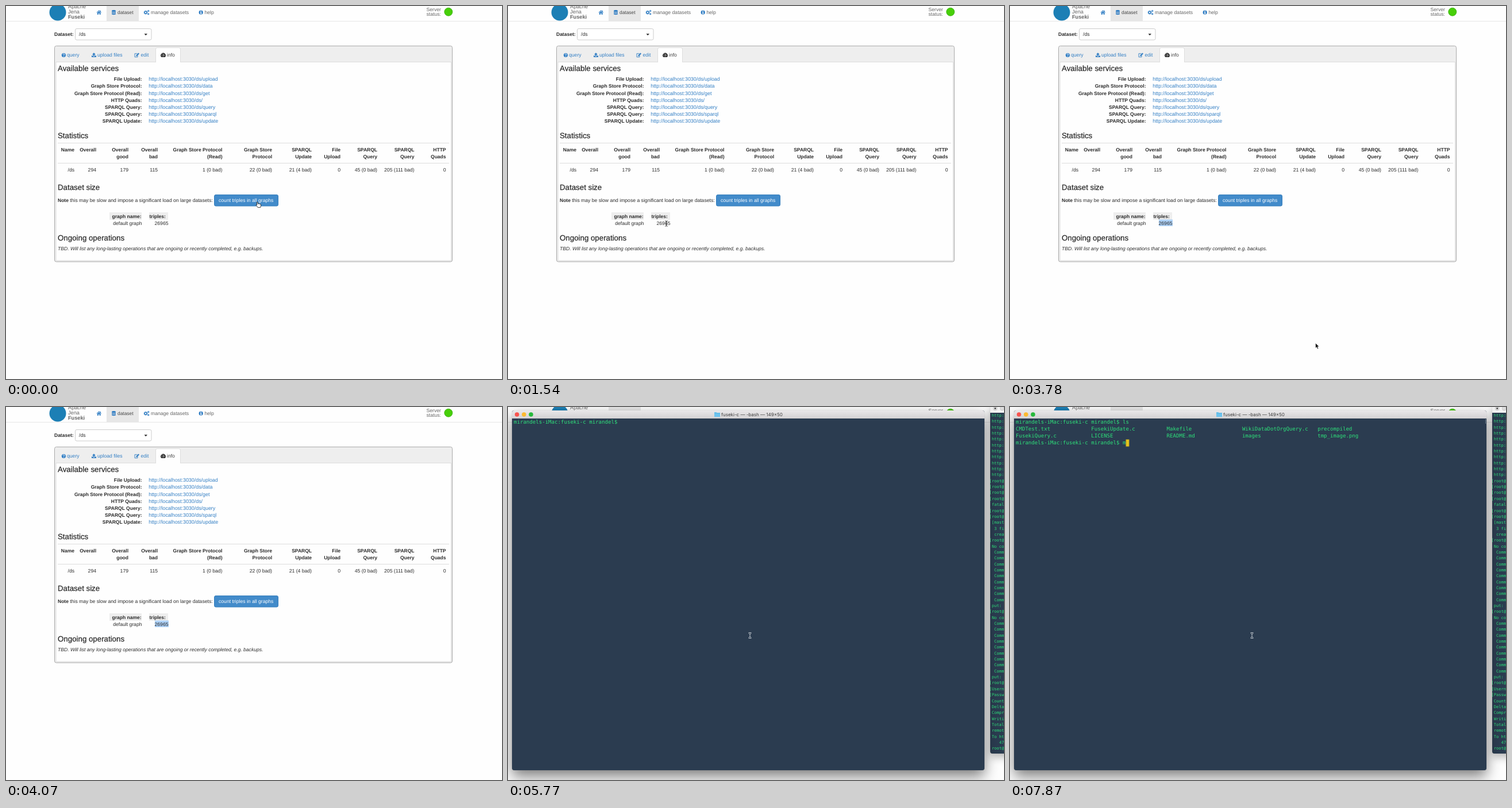
Write an HTML page that moves like this. It is 863 px wide and 649 px high and loops after 8000 ms.

```html
<!DOCTYPE html>
<html lang="en">
<head>
<meta charset="utf-8">
<title>Dataset info and terminal</title>
<style>
html, body { margin: 0; width: 100%; height: 100%; overflow: hidden; background: #fefefe; }
#stage { position: relative; width: 863px; height: 649px; overflow: hidden; background: #fefefe; }
svg, #term, .win, pre { position: absolute; }
svg { left: 0; top: 0; }
text, pre { text-rendering: geometricPrecision; white-space: pre; }
#page { font: 8.65px "Liberation Sans", Arial, sans-serif; fill: #2b2b2b; }
.b { font-size: 8.5px; font-weight: bold; }
.h { font-size: 13.3px; stroke: #2b2b2b; stroke-width: .25px; }
.r { text-anchor: end; }
.link { fill: #337fc4; }
.url { font-size: 8.88px; }
.grey { fill: #666; }
.brand { font-size: 9.2px; }

/* Windows */
#term { inset: 0; }
.win { background: #2b3c50; box-sizing: border-box; overflow: hidden; }
.front { left: 7px; top: 6px; width: 822px; height: 625.5px; border-radius: 4px; box-shadow: 0 11px 24px rgba(0,0,0,.5), 0 0 1px rgba(0,0,0,.4); }
.back { left: 839px; top: -4px; width: 60px; height: 606.5px; border-radius: 4px; box-shadow: 0 6px 16px rgba(0,0,0,.3), 0 0 1px rgba(0,0,0,.4); }
.bar { height: 14px; background: linear-gradient(#e9e7e9, #d3d1d3); }
.back .bar { background: #f3f3f3; }
pre { left: -1.5px; top: 14px; margin: 0; font: 7.1px/10.34px "DejaVu Sans Mono", monospace; color: #2ee07a; }
#shell { font: 9.09px "DejaVu Sans Mono", monospace; fill: #2ee07a; }

/* Timeline: hard changes only */
.t { animation: 8s step-end infinite; }
.off { opacity: 0; }
#term { animation-name: term; }
#hand { animation-name: hand; }
#arrow { animation-name: arrow; }
#beam { animation-name: beam; }
#pick { animation-name: pick; }
#beam2 { animation-name: beam2; }
#block { animation-name: block; }
#l { animation-name: typeL; }
#s { animation-name: typeS; }
#out { animation-name: out; }
#m { animation-name: typeM; }
@keyframes term { 58.375% { opacity: 1; } }
@keyframes hand { 7.5% { opacity: 0; } }
@keyframes pick { 26.75% { opacity: 1; } }
@keyframes arrow {
  7.5% { opacity: 1; transform: translate(371px, 356px); }
  10.125% { transform: translate(329px, 357px); }
  11.875% { transform: translate(283px, 368px); }
  13.75% { opacity: 0; }
  32.25% { opacity: 1; transform: translate(368px, 391px); }
  47.25% { transform: translate(531px, 586px); }
  49.125% { transform: translate(597px, 642px); }
  50.875% { opacity: 0; }
}
@keyframes beam {
  13.75% { opacity: 1; transform: translate(275px, 370.5px); }
  15.625% { transform: translate(274px, 375px); }
  17.375% { transform: translate(273.5px, 374px); }
  19.25% { transform: translate(272.8px, 373px); }
  30.375% { transform: translate(274.6px, 372.5px); }
  32.25% { opacity: 0; }
}
@keyframes beam2 {
  64% { opacity: 1; transform: translate(500px, 465px); }
  66.5% { transform: translate(418px, 392px); }
}
@keyframes block {
  72.125% { opacity: 0; }
  77.75% { opacity: 1; transform: none; }
  79.625% { transform: translate(5.47px, 0); }
  81.5% { transform: translate(10.94px, 0); }
  83.375% { transform: translate(0, 36.5px); }
  96.5% { opacity: 0; }
  98.375% { opacity: 1; transform: translate(5.47px, 36.5px); }
}
@keyframes typeL { 79.625% { opacity: 1; } }
@keyframes typeS { 81.5% { opacity: 1; } }
@keyframes out { 83.375% { opacity: 1; } }
@keyframes typeM { 98.375% { opacity: 1; } }
</style>
</head>
<body>
<div id="stage">
<svg id="page" width="863" height="649">
  <!-- Navigation -->
  <path d="M0 26.5H863" stroke="#e7e7e7"/>
  <rect x="175" width="56" height="26" fill="#e7e7e7"/>
  <circle cx="90" cy="11" r="14.5" fill="#1c7fb5"/>
  <g class="grey brand">
    <text x="108" y="4">Apache</text>
    <text x="108" y="13">Jena</text>
    <text x="108" y="21.6" font-weight="bold">Fuseki</text>
  </g>
  <g class="link">
    <path d="M157.5 11.2 161.7 7.2 163.6 9V7.7H164.8V10.1L166 11.2 165.3 11.8 161.7 8.6 158.2 11.8ZM158.9 11.7 161.7 9.3 164.6 11.7V15H162.6V12.6H160.9V15H158.9Z"/>
    <path d="M184 8.3C184 6.6 191 6.6 191 8.3V9C191 10.3 184 10.3 184 9ZM184 10.1Q187.5 11.6 191 10.1V11.3C191 12.6 184 12.6 184 11.3ZM184 12.4Q187.5 13.9 191 12.4V14C191 15.5 184 15.5 184 14Z"/>
    <g fill="none" stroke="#337fc4">
      <circle cx="243" cy="11.3" r="2" stroke-width="1.6"/>
      <circle cx="243" cy="11.3" r="3" stroke-dasharray="1.2 1.15"/>
      <circle cx="247.7" cy="8.6" r="1.1" stroke-width="1.1"/>
      <circle cx="247.7" cy="13.8" r="1.1" stroke-width="1.1"/>
    </g>
    <circle cx="339.2" cy="11.2" r="3.6"/>
    <path d="M338.5 8.3H340V9.4H338.5ZM338 10.2H340V13H340.6V13.8H338V13H338.6V11H338Z" fill="#fff"/>
  </g>
  <text x="194" y="14" fill="#444" font-size="8.4">dataset</text>
  <g class="grey">
    <text x="252" y="14">manage datasets</text>
    <text x="345.5" y="14">help</text>
    <text x="731.5" y="9">Server</text>
    <text x="731.5" y="17.3">status:</text>
  </g>
  <circle cx="769.8" cy="10.2" r="7" fill="#47cf08" stroke="#35ad0a" stroke-width=".8"/>

  <!-- Dataset chooser -->
  <text class="b" x="84" y="52">Dataset:</text>
  <rect x="120.5" y="39.5" width="132.5" height="19.5" rx="2.5" fill="#fff" stroke="#ccc"/>
  <text x="127" y="52">/ds</text>
  <path d="M240.5 48.3H246L243.2 51.2Z"/>

  <!-- Tab panel -->
  <rect x="84.5" y="69.5" width="692" height="375.5" rx="3" fill="#eee" stroke="#aaa"/>
  <rect x="87" y="97.5" width="687.5" height="345.5" fill="#fefefe" stroke="#ddd"/>
  <path d="M260.5 98V75Q260.5 72.5 263 72.5H301Q303.5 72.5 303.5 75V98" fill="#fefefe" stroke="#ddd"/>
  <g class="link">
    <circle cx="100.4" cy="85.5" r="3.6"/>
    <path d="M99 84.5Q99.1 83.3 100.4 83.3 101.8 83.4 101.8 84.5 101.7 85.2 100.5 85.8V86.3M100.5 87V88" fill="none" stroke="#fff" stroke-width=".9"/>
    <path d="M152.9 81.3 156 84.5H154V87H151.8V84.5H149.8ZM149 86.3H151.2V87.7H154.6V86.3H157V89H149Z"/>
    <path d="M229 86V88.8H224V82.8H228.5" fill="none" stroke="#337fc4" stroke-width=".9"/>
    <path d="M226.3 87.3V85.7L230.4 81.5 232 83.1 227.9 87.3Z"/>
    <text x="106" y="88.3">query</text>
    <text x="159" y="88.3">upload files</text>
    <text x="234.5" y="88.3">edit</text>
  </g>
  <path d="M270.3 89A4.4 4.4 0 1 1 276.8 89Z" fill="#333"/>
  <path d="M273.3 87.7 274.6 84M270.4 86.2H271.4M275.8 86.2H276.8M271.4 83.7 272 84.3M273.2 82.7V83.5" stroke="#fff" stroke-width=".8"/>
  <text x="280" y="88.3" fill="#444">info</text>

  <!-- Services -->
  <text class="h" x="90" y="112.5">Available services</text>
  <g class="b r">
    <text x="236.5" y="130.2">File Upload:</text>
    <text x="236.5" y="142.4">Graph Store Protocol:</text>
    <text x="236.5" y="154.5">Graph Store Protocol (Read):</text>
    <text x="236.5" y="166.7">HTTP Quads:</text>
    <text x="236.5" y="178.9">SPARQL Query:</text>
    <text x="236.5" y="191">SPARQL Query:</text>
    <text x="236.5" y="203.2">SPARQL Update:</text>
  </g>
  <g class="link url">
    <text x="248.3" y="130.2">http://localhost:3030/ds/upload</text>
    <text x="248.3" y="142.4">http://localhost:3030/ds/data</text>
    <text x="248.3" y="154.5">http://localhost:3030/ds/get</text>
    <text x="248.3" y="166.7">http://localhost:3030/ds/</text>
    <text x="248.3" y="178.9">http://localhost:3030/ds/query</text>
    <text x="248.3" y="191">http://localhost:3030/ds/sparql</text>
    <text x="248.3" y="203.2">http://localhost:3030/ds/update</text>
  </g>

  <!-- Statistics -->
  <text class="h" x="90" y="230">Statistics</text>
  <path d="M90 238.5H771M90 273.5H771" stroke="#ddd"/>
  <g class="r" id="stats"></g>

  <!-- Dataset size -->
  <text class="h" x="90" y="319.5">Dataset size</text>
  <text x="90" y="341"><tspan class="b">Note</tspan> this may be slow and impose a significant load on large datasets:</text>
  <rect x="362.5" y="328.5" width="111" height="19.5" rx="2.5" fill="#428bca" stroke="#357ebd"/>
  <text x="370" y="341.3" fill="#fff">count triples in all graphs</text>
  <path d="M180 359H236V372H180ZM249 359H282V372H249Z" fill="#eee"/>
  <text class="b r" x="235.5" y="368.6">graph name:</text>
  <text class="b" x="249.5" y="368.6">triples:</text>
  <rect id="pick" class="t off" x="259" y="371.5" width="24" height="11.5" fill="#aed2f8"/>
  <text class="r" x="236.5" y="381">default graph</text>
  <text class="r" x="282.5" y="381">26965</text>

  <text class="h" x="90" y="407.5">Ongoing operations</text>
  <text x="90" y="425.3" font-size="8.57" font-style="italic">TBD. Will list any long-lasting operations that are ongoing or recently completed, e.g. backups.</text>

  <!-- Pointers -->
  <path id="hand" class="t" transform="translate(434 340)" d="M2.3 1.3Q3.1 .3 3.9 1.3L4.4 4.2 6 4 7.5 4.4 9.2 5Q9.9 6 9.2 8.5L8.7 10.6H4.2Q2.8 8.2 1 6.7 1 5.4 2.7 6.2Z" fill="#fff" stroke="#111" stroke-width=".8"/>
  <path id="arrow" class="t off" d="M.5 .5V9.2L2.5 7.4 4 10.7 5.6 10 4.2 6.8H7Z" fill="#111" stroke="#fff" stroke-width=".6"/>
  <path id="beam" class="t off" d="M.6 .7Q2.7 .7 2.7 2.4V8.6Q2.7 10.3 .6 10.3M4.8 .7Q2.7 .7 2.7 2.4M2.7 8.6Q2.7 10.3 4.8 10.3M1.7 6H3.7" fill="none" stroke="#222" stroke-width=".9"/>
</svg>

<div id="term" class="t off">
  <div class="win back"><div class="bar"></div><pre> http:
 http:
 http:
 http:
 http:
 http:
 http:
 http:
 http:
 http:
 http:
[root@
[root@
[root@
[root@
 fatal
[root@
[root@
 [mast
  3 fi
  crea
[root@
 No co
  Comm
  Comm
  Comm
  Comm
  Comm
  Comm
  Comm
  Comm
  Comm
 put:
[root@
 No co
  Comm
  Comm
  Comm
  Comm
  Comm
  Comm
  Comm
  Comm
  Comm
 put:
[root@
[Usern
[Passw
 Count
 Delta
 Compr
 Writi
 Total
 remot
 To ht
    47
 root@</pre></div>
  <div class="win front"><div class="bar"></div></div>
  <svg id="shell" width="863" height="649">
    <circle cx="847.7" cy="2.5" r="3.4" fill="#ddd" stroke="#bbb" stroke-width=".6"/>
    <circle cx="847.7" cy="2.5" r="1.4" fill="#444"/>
    <circle cx="859.7" cy="2.5" r="3.4" fill="#ddd" stroke="#bbb" stroke-width=".6"/>
    <circle cx="15.6" cy="13" r="3.8" fill="#f9544f"/>
    <circle cx="27.8" cy="13" r="3.8" fill="#fcb92f"/>
    <circle cx="40" cy="13" r="3.8" fill="#27b93c"/>
    <path d="M359 9H362.5L363.5 10H369V17.3H359Z" fill="#6cc3ee"/>
    <path d="M359 11H369" stroke="#55addb" stroke-width=".6"/>
    <text x="371" y="16" font-family="Inter, sans-serif" font-size="8" fill="#3c3c3c">fuseki-c — -bash — 149×50</text>

    <rect id="block" class="t" x="196.2" y="20" width="5.6" height="12.2" fill="#e6c51c"/>
    <text x="10" y="28.7">mirandels-iMac:fuseki-c mirandel$</text>
    <text id="l" class="t off" x="196" y="28.7">l</text>
    <text id="s" class="t off" x="201.5" y="28.7">s</text>
    <g id="out" class="t off">
      <path d="M827.6 21V29" stroke="#8b98a6" stroke-width=".8"/>
      <text x="10" y="40.9">CMDTest.txt</text>
      <text x="141.3" y="40.9">FusekiUpdate.c</text>
      <text x="272.6" y="40.9">Makefile</text>
      <text x="403.9" y="40.9">WikiDataDotOrgQuery.c</text>
      <text x="535.2" y="40.9">precompiled</text>
      <text x="10" y="53">FusekiQuery.c</text>
      <text x="141.3" y="53">LICENSE</text>
      <text x="272.6" y="53">README.md</text>
      <text x="403.9" y="53">images</text>
      <text x="535.2" y="53">tmp_image.png</text>
      <text x="10" y="65.2">mirandels-iMac:fuseki-c mirandel$</text>
    </g>
    <text id="m" class="t off" x="196" y="65.2">m</text>
    <path id="beam2" class="t off" d="M.6 .7H5.4M.6 10.3H5.4M1.3 .9Q1.3 3 3 4.2 4.7 3 4.7 .9M1.3 10.1Q1.3 8 3 6.8 4.7 8 4.7 10.1M3 4.2V6.8" fill="none" stroke="#dfe4e8" stroke-width=".8"/>
  </svg>
</div>
</div>
<script>
// Right edge, heading lines and value of each statistics column
const columns = [
  [119, "Name", "", "/ds"], [157, "Overall", "", "294"],
  [213, "Overall", "good", "179"], [264, "Overall", "bad", "115"],
  [376.5, "Graph Store Protocol", "(Read)", "1 (0 bad)"],
  [463, "Graph Store", "Protocol", "22 (0 bad)"],
  [532, "SPARQL", "Update", "21 (4 bad)"], [582, "File", "Upload", "0"],
  [646, "SPARQL", "Query", "45 (0 bad)"], [710.5, "SPARQL", "Query", "205 (111 bad)"],
  [765.5, "HTTP", "Quads", "0"]
];
document.getElementById("stats").innerHTML = columns.map(([x, top, sub, value]) =>
  `<text class="b" x="${x}" y="253">${top}</text>
   <text class="b" x="${x}" y="265.2">${sub}</text>
   <text x="${x}" y="287.7">${value}</text>`).join("");
</script>
</body>
</html>
```
